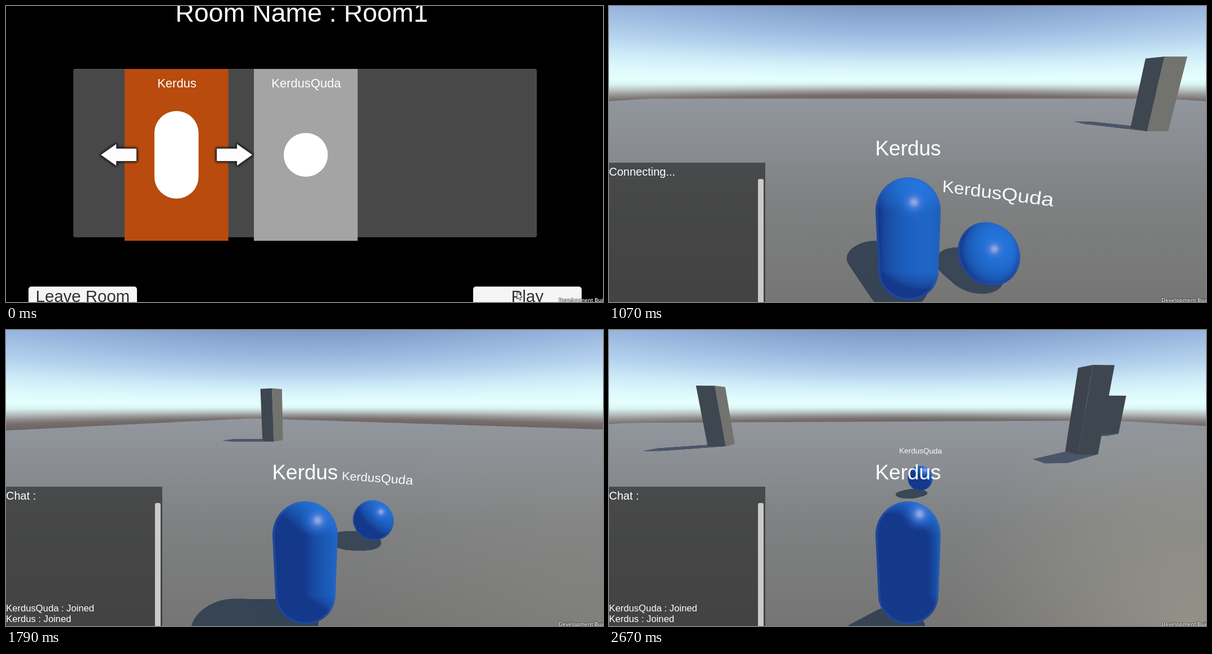
Recreate the animation shown at these times as an HTML page with a canvas. Size 1062 by 527 pixels, loop 2740 ms.

```html
<!DOCTYPE html>
<html lang="en">
<head>
<meta charset="utf-8">
<title>Room lobby and play</title>
<style>
html, body { margin: 0; width: 100%; height: 100%; overflow: hidden; background: #000; }
canvas { display: block; }
</style>
</head>
<body>
<canvas id="stage" width="1062" height="527"></canvas>
<script>
const W = 1062, H = 527, LOOP = 2740;
const c = document.getElementById('stage').getContext('2d');
const SANS = '"Liberation Sans", Arial, sans-serif';
const HOST = 'Kerdus', GUEST = 'KerdusQuda';

// The picture advances in short bursts: [first, last, steps]
const bursts = [[0, 0, 1], [70, 500, 7], [750, 750, 1], [880, 1260, 7], [1330, 1520, 4],
  [1590, 1790, 4], [1840, 2150, 5], [2220, 2670, 8]];
const ticks = bursts.flatMap(([a, b, n]) =>
  Array.from({ length: n }, (_, i) => Math.floor(a + (b - a) * i / Math.max(1, n - 1))));

const mix = (a, b, k) => a + (b - a) * k;
const clamp = (v, lo = 0, hi = 1) => Math.min(hi, Math.max(lo, v));

// Linear motion through key points [time, ...values]
function track(t, ...keys) {
  let i = 0;
  while (i < keys.length - 2 && t >= keys[i + 1][0]) i++;
  const [ta, ...a] = keys[i], [tb, ...b] = keys[i + 1];
  const k = clamp((t - ta) / (tb - ta));
  return a.map((v, j) => mix(v, b[j], k));
}

function text(s, x, y, size, color = '#fff', align = 'left') {
  c.font = `${size}px ${SANS}`;
  c.fillStyle = color;
  c.textAlign = align;
  c.fillText(s, x, y);
}

function rect(x, y, w, h, color, r = 0) {
  c.fillStyle = color;
  c.beginPath();
  c.roundRect(x, y, w, h, r);
  c.fill();
}

function poly(color, points) {
  c.fillStyle = color;
  c.beginPath();
  points.forEach(([x, y]) => c.lineTo(x, y));
  c.closePath();
  c.fill();
}

function fade(g, ...stops) {
  stops.forEach(([k, color]) => g.addColorStop(k, color));
  return g;
}

function buildMark() {
  c.font = '600 9.5px "Open Sans", "Noto Sans", sans-serif';
  c.textAlign = 'left';
  c.lineWidth = 1.5;
  c.lineJoin = 'round';
  c.strokeStyle = 'rgba(0,0,0,.6)';
  c.strokeText('Development Build', 983, 526.5);
  c.fillStyle = '#fff';
  c.fillText('Development Build', 983, 526.5);
}

// ---- Lobby ----

function arrow(tip, dir) {
  c.save();
  c.translate(tip, 265);
  c.scale(dir, 1);
  c.shadowColor = '#000';
  c.shadowBlur = 4;
  c.lineWidth = 3;
  c.lineJoin = 'round';
  c.strokeStyle = '#35353c';
  poly('#fdfdfd', [[0, 0], [27, -19], [27, -11], [63, -11], [63, 11], [27, 11], [27, 19]]);
  c.stroke();
  c.shadowBlur = 0;
  c.fill();
  c.restore();
}

function cursor(x, y) {
  c.save();
  c.translate(x, y);
  poly('#fff', [[0, 0], [0, 13], [3, 10.5], [5.2, 15], [7.4, 14], [5.3, 9.6], [9.3, 9.3]]);
  c.lineWidth = 1;
  c.strokeStyle = '#222';
  c.stroke();
  c.restore();
}

function card(x, color, name, height) {
  rect(x, 112, 184.5, 306, color);
  text(name, x + 93, 145, 22, '#fff', 'center');
  rect(x + 53, 265 - height / 2, 78.5, height, '#fff', 39);
}

function button(x, label, color) {
  rect(x, 499.5, 193, 40, color, 5);
  text(label, x + 96.5, 527, 29.5, '#323232', 'center');
}

function lobby(t) {
  rect(0, 0, W, H, '#000');
  text('Room Name : Room1', 526, 28, 46.5, '#fff', 'center');
  rect(120.5, 112.5, 823, 298.5, '#484848', 2);
  c.lineWidth = 1;
  c.strokeStyle = '#5a5a5a';
  c.stroke();
  card(211, '#b84b0d', HOST, 156);
  card(441, '#a4a4a4', GUEST, 78);
  arrow(169, 1);
  arrow(438, -1);
  button(40, 'Leave Room', '#f5f5f5');
  button(831, 'Play', t < 210 ? '#f5f5f5' : '#eeeeee');
  buildMark();
  if (t < 750) {
    const k = clamp(t / 500), e = k * k * (3 - 2 * k);
    cursor(mix(909, 782, e), mix(509, 319, e));
  }
}

// ---- World: north, east and height, measured in camera heights ----

const CX = W / 2, CY = 264, F = 476, PITCH = Math.PI / 12;
const SIN = Math.sin(PITCH), COS = Math.cos(PITCH);
const HORIZON = CY - F * SIN / COS;
const BEHIND = 1.07, FIELD = 16.67, RADIUS = .15;
const CAST = [.69, -.45];           // ground shift of a shadow per unit of height
const boxes = [                     // south, west, north, east, height
  [-8.47, 7.29, -7.6, 7.75, 1.39],
  [-4.18, 3.1, -3.72, 3.52, 1.8],
  [4.56, 5.1, 5, 5.55, 1.5]];
const cam = {};

function placeCamera(yaw, [n, e]) {
  cam.yaw = yaw;
  cam.sin = Math.sin(yaw);
  cam.cos = Math.cos(yaw);
  cam.n = n - BEHIND * cam.cos;
  cam.e = e - BEHIND * cam.sin;
}

const ahead = (n, e) => n * cam.cos + e * cam.sin;
const aside = (n, e) => e * cam.cos - n * cam.sin;

function project(n, e, h = 0) {
  const d = ahead(n - cam.n, e - cam.e), drop = 1 - h;
  const z = d * COS + drop * SIN;
  return [CX + F * aside(n - cam.n, e - cam.e) / z, CY + F * (drop * COS - d * SIN) / z, z];
}

// Sky bands bend away from the horizon towards the sides
function makeSky() {
  const sky = document.createElement('canvas');
  sky.width = W;
  sky.height = 190;
  const s = sky.getContext('2d');
  for (let x = 0; x < W; x++) {
    const k = Math.hypot(1, (x - CX) * COS / F);
    s.fillStyle = fade(s.createLinearGradient(0, HORIZON - HORIZON * k, 0, HORIZON + (190 - HORIZON) * k),
      [0, '#7c99c4'], [.13, '#8aa9d3'], [.27, '#9dbae0'], [.42, '#b5d3ee'], [.53, '#cdebf7'],
      [.61, '#dcf7fb'], [.69, '#e5ffff'], [.73, '#daf3f3'], [.765, '#bac6c6'], [.8, '#949291'],
      [.83, '#776f6d'], [.88, '#6a615f'], [1, '#645c5a']);
    s.fillRect(x, 0, 1, 190);
  }
  return sky;
}
const sky = makeSky();

function ground() {
  const points = [];
  for (let deg = -60; deg <= 60; deg++) {
    const a = cam.yaw + deg * Math.PI / 180, n = Math.cos(a), e = Math.sin(a);
    const reach = Math.min((Math.sign(n) * FIELD - cam.n) / n, (Math.sign(e) * FIELD - cam.e) / e);
    points.push(project(cam.n + n * reach, cam.e + e * reach));
  }
  poly(fade(c.createLinearGradient(0, 158, 0, H),
    [0, '#92979f'], [.2, '#8b8f94'], [.5, '#7f8182'], [1, '#757574']),
    [...points, [W + 400, H], [-400, H]]);
  const warm = .6 * (cam.yaw / 1.66) ** 2;
  rect(500, 180, 562, 347, fade(c.createRadialGradient(1040, 520, 0, 1040, 520, 430),
    [0, `rgba(166,162,148,${warm})`], [1, 'rgba(166,162,148,0)']));
}

// Shadow of an upright body: its outline swept along the sun's direction
function shadow(outline, low, high, color) {
  for (let i = 0; i <= 60; i++) {
    const h = mix(low, high, i / 60);
    const points = outline.map(([n, e]) => project(n + CAST[0] * h, e + CAST[1] * h));
    if (points.every(p => p[2] > .2)) poly(color, points);
  }
}

const circle = (n, e) => Array.from({ length: 40 }, (_, i) =>
  [n + RADIUS * Math.cos(i * Math.PI / 20), e + RADIUS * Math.sin(i * Math.PI / 20)]);

function box([s, w, n, e, h]) {
  const face = (color, ...ends) => {
    const [a, b] = ends.map(p => project(...p)), [d, f] = ends.map(p => project(...p, h));
    if (a[2] > .2 && b[2] > .2) poly(color, [a, b, f, d]);
  };
  if (cam.n < s) face('#72736f', [s, w], [s, e]);
  if (cam.n > n) face('#3d444e', [n, w], [n, e]);
  if (cam.e < w) face('#3e4650', [s, w], [n, w]);
  if (cam.e > e) face('#72736f', [s, e], [n, e]);
}

// Sun direction as right, up and towards a viewer looking down by tilt
function sun(tilt) {
  const len = Math.hypot(...CAST, 1), up = 1 / len;
  const fwd = -ahead(...CAST) / len;
  return [-aside(...CAST) / len,
    fwd * Math.sin(tilt) + up * Math.cos(tilt), up * Math.sin(tilt) - fwd * Math.cos(tilt)];
}

const blue = v => `rgb(${mix(20, 34, v)},${mix(56, 118, v)},${mix(138, 220, v)})`;

// Rows of a round body, lit by the sun; rise gives how far a row faces up
function shade(path, x, y, r, top, bottom, [right, up, back], rise) {
  c.save();
  c.clip(path);
  for (let row = Math.floor(top); row < bottom; row++) {
    const u = clamp(rise(row + .5), -1, 1), ring = Math.max(.05, Math.sqrt(1 - u * u));
    const g = c.createLinearGradient(x - r * ring, 0, x + r * ring, 0);
    for (let s = -1; s <= 1; s += .125) {
      const lit = u * up + ring * (s * right + Math.sqrt(1 - s * s) * back);
      g.addColorStop((s + 1) / 2, blue(clamp(lit) ** .7));
    }
    c.fillStyle = g;
    c.fillRect(x - 2 * r, row, 4 * r, 1);
  }
  c.lineWidth = r * .14;
  c.strokeStyle = 'rgba(58,104,188,.3)';
  c.stroke(path);
  const [sx, sy, sz] = sun(PITCH + Math.atan((y - CY) / F)), n = Math.hypot(sx, sy, sz + 1);
  const hx = x + r * sx / n, hy = y - r * sy / n;
  c.fillStyle = fade(c.createRadialGradient(hx, hy, 0, hx, hy, r * .55),
    [0, '#9aaee0'], [.15, '#7f9ce0'], [.34, 'rgba(76,126,218,.8)'], [.65, 'rgba(46,112,214,.35)'],
    [1, 'rgba(36,104,210,0)']);
  c.fill(path);
  c.restore();
}

function guestBall(n, e) {
  const [x, y, z] = project(n, e, .167), r = F * RADIUS / z;
  const long = r * Math.hypot(x - CX, y - CY, F) / F;
  const path = new Path2D();
  path.ellipse(x, y, long, r, Math.atan2(y - CY, x - CX), 0, 7);
  shade(path, x, y, r, y - long, y + long, sun(PITCH + Math.atan((y - CY) / F)), row => (y - row) / long);
}

const capsule = new Path2D('M474 365A58 60 0 0 1 590 365L586 472A53.5 52 0 0 1 479 472Z');

function hostCapsule() {
  shade(capsule, 532, 363, 58, 305, 525, sun(0),
    row => row < 365 ? (365 - row) / 60 : Math.min(0, (472 - row) / 52));
}

// Name tag turned towards the camera, drawn letter by letter in perspective
function nameTag(name, n, e) {
  const dn = n - cam.n, de = e - cam.e, far = Math.hypot(dn, de), unit = .00089;
  const rn = -de / far * unit, re = dn / far * unit;
  c.font = `100px ${SANS}`;
  let pen = -c.measureText(name).width / 2;
  for (const ch of name) {
    const width = c.measureText(ch).width, mid = pen + width / 2;
    const spot = (a, h) => project(n + rn * a, e + re * a, .5 + h * unit);
    const [x, y] = spot(mid, 0), [ax, ay] = spot(mid + 1, 0), [bx, by] = spot(mid, -1);
    c.save();
    c.transform(ax - x, ay - y, bx - x, by - y, x, y);
    text(ch, 0, 35, 100, '#f8fbfc', 'center');
    c.restore();
    pen += width;
  }
}

function chat(t) {
  rect(0, 279, 278, 248, 'rgba(40,40,40,.65)');
  rect(265, 308, 10, 230, '#cacaca', 3);
  text(t < 1200 ? 'Connecting...' : 'Chat :', 0, 302, 20);
  if (t >= 1590) {
    text(GUEST + ' : Joined', 0, 501, 16.7);
    text(HOST + ' : Joined', 0, 520, 16.7);
  }
}

function world(t) {
  const [yaw] = track(t, [1070, 0], [1520, 1.6], [1790, 56.5], [2220, 88], [2670, 95]);
  const host = track(t, [1520, 0, 0], [1790, 0, -.13], [2220, .12, -.86], [2670, .34, -1.19]);
  const guest = track(t, [1070, .1, .41], [1520, .01, .83]);
  placeCamera(yaw * Math.PI / 180, host);
  c.drawImage(sky, 0, 0);
  ground();
  for (const [s, w, n, e, h] of boxes) shadow([[s, w], [s, e], [n, e], [n, w]], 0, h, '#4b566a');
  shadow(circle(...guest), .1, .22, '#3a4756');
  shadow(circle(...host), .1, .47, '#364454');
  boxes.forEach(box);
  guestBall(...guest);
  hostCapsule();
  nameTag(GUEST, ...guest);
  text(HOST, 532, 266, 37, '#fff', 'center');
  chat(t);
  buildMark();
}

function draw() {
  const now = performance.now() % LOOP;
  const t = ticks.findLast(v => v <= now);
  (t < 880 ? lobby : world)(t);
  requestAnimationFrame(draw);
}
draw();
</script>
</body>
</html>
```
